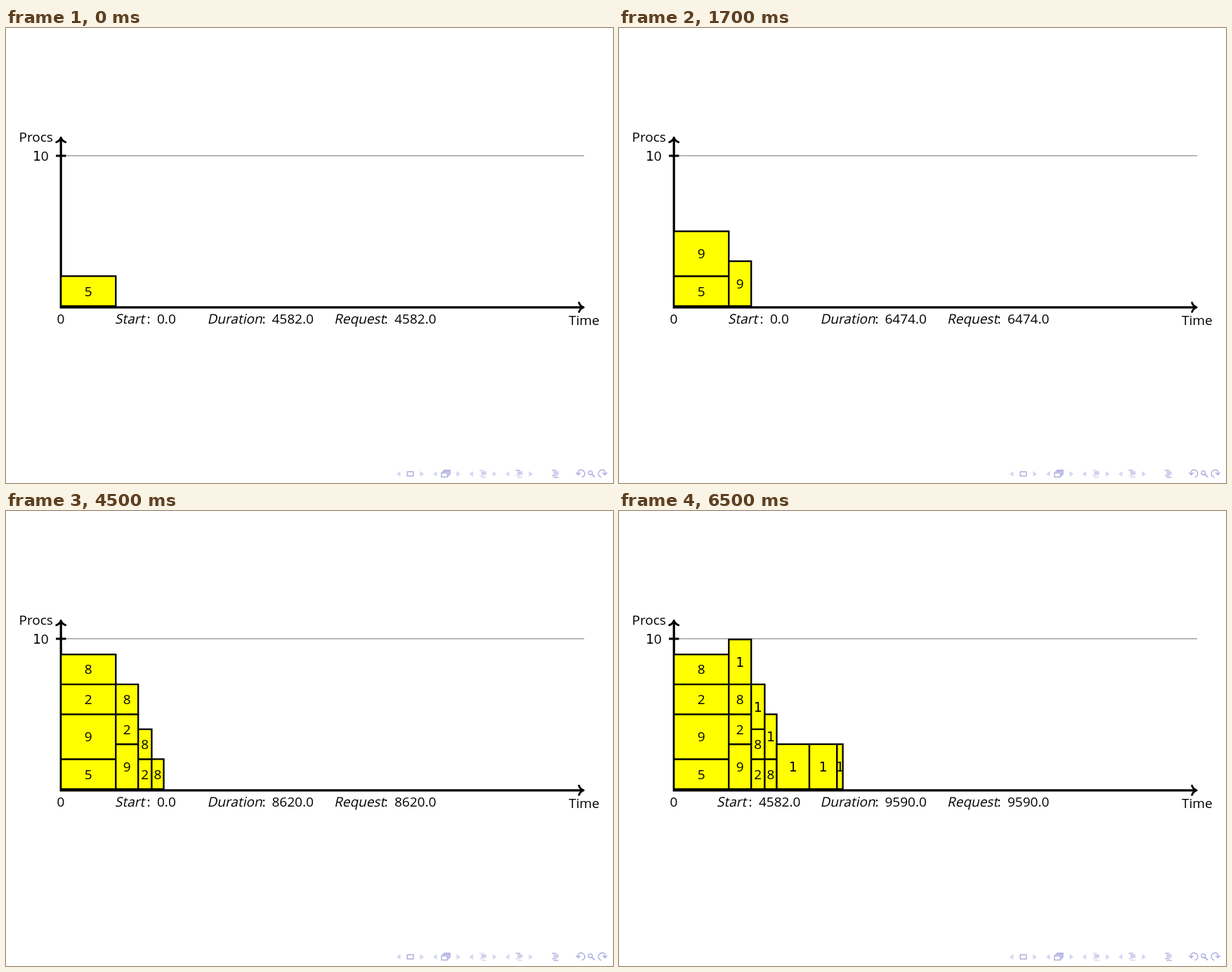
These frames come from a looping animation (864x648 px, 8000 ms). An HTML page:

```html
<!DOCTYPE html>
<html lang="en">
<head>
<meta charset="utf-8">
<title>Job schedule</title>
<style>
html, body { margin: 0; width: 100%; height: 100%; overflow: hidden; background: #fff; }
svg { display: block; width: 864px; height: 648px; }
text { font: 19px "Open Sans", "Noto Sans", sans-serif; fill: #000; }
.one { font: 19px "DejaVu Sans", sans-serif; }
.mid { text-anchor: middle; }
.axis { fill: none; stroke: #000; stroke-width: 3.2; }
.tip { fill: none; stroke: #000; stroke-width: 2.8; stroke-linecap: round; stroke-linejoin: round; }
.block rect { fill: #ff0; stroke: #000; stroke-width: 2.3; }
.pale { fill: #d6d6f0; }
.paleLine { stroke: #d6d6f0; fill: none; stroke-width: 1.4; }
.deepLine { stroke: #adade0; fill: none; stroke-width: 1.4; }

.block, .info { animation: 8s step-end infinite; }
.block.s1 { animation-name: add1; }
.block.s2 { animation-name: add2; }
.block.s3 { animation-name: add3; }
.block.s4 { animation-name: add4; }
.info.s0 { animation-name: info0; }
.info.s1 { animation-name: info1; }
.info.s2 { animation-name: info2; }
.info.s3 { animation-name: info3; }
.info.s4 { animation-name: add4; }
@keyframes add1 { 0% { visibility: hidden } 6.25%, 100% { visibility: visible } }
@keyframes add2 { 0% { visibility: hidden } 31.25%, 100% { visibility: visible } }
@keyframes add3 { 0% { visibility: hidden } 56.25%, 100% { visibility: visible } }
@keyframes add4 { 0% { visibility: hidden } 81.25%, 100% { visibility: visible } }
@keyframes info0 { 0% { visibility: visible } 6.25%, 100% { visibility: hidden } }
@keyframes info1 { 0% { visibility: hidden } 6.25% { visibility: visible } 31.25%, 100% { visibility: hidden } }
@keyframes info2 { 0% { visibility: hidden } 31.25% { visibility: visible } 56.25%, 100% { visibility: hidden } }
@keyframes info3 { 0% { visibility: hidden } 56.25% { visibility: visible } 81.25%, 100% { visibility: hidden } }
</style>
</head>
<body>
<svg viewBox="0 0 864 648">
  <path d="M78 181.8H823" stroke="#8c8c8c" stroke-width="1.2"/>
  <path class="axis" d="M78.2 398V157M76.6 397.8H821M71 182H85.4"/>
  <path class="tip" d="M71.6 162.6C74.6 161.6 77.4 158.6 78.2 156C79 158.6 81.8 161.6 84.8 162.6"/>
  <path class="tip" d="M815.6 391.2C816.6 394.2 819.6 397 822.2 397.8C819.6 398.6 816.6 401.4 815.6 404.4"/>
  <text x="18.5" y="162">Procs</text>
  <text x="801" y="423">Time</text>
  <text class="one" x="38" y="189">1</text>
  <text x="49.8" y="189">0</text>
  <text class="mid" x="78" y="421">0</text>
  <g id="blocks"></g>
  <g id="infos"></g>
  <g id="nav">
    <path class="deepLine" d="M571.2 632H579.8V638H571.2Z"/>
    <path class="deepLine" d="M619.8 633.5H628.2V639.5H619.8ZM621.8 633V631.5H630.2V637.5H628.5M623.8 631V629.7H632V635.6H630.5"/>
    <path class="deepLine" d="M814.5 635.2C812.6 626.5 823.6 628.3 823.8 634.6Q823.8 638.6 819.6 640M811.4 633L814.6 636.4L817.6 633"/>
    <path class="deepLine" d="M852.5 635.2C854.4 626.5 843.4 628.3 843.2 634.6Q843.2 638.6 847.4 640M855.6 633L852.4 636.4L849.4 633"/>
    <circle class="deepLine" cx="831.8" cy="633.4" r="2.8"/>
    <path class="deepLine" style="stroke-width:2" d="M834 635.6L838 639.6"/>
  </g>
</svg>
<script>
const NS = "http://www.w3.org/2000/svg";
const $ = id => document.getElementById(id);

function add(parent, tag, attrs, content = "") {
  const el = document.createElementNS(NS, tag);
  for (const key in attrs) el.setAttribute(key, attrs[key]);
  el.textContent = content;
  return parent.appendChild(el);
}

// Jobs in order of arrival, with the processors each one takes.
const jobs = [["5", 2], ["9", 3], ["2", 2], ["8", 2], ["1", 3]];
const edges = [78.2, 156.3, 188.2, 207.4, 224.5, 271, 310.3, 318.6];
const stacks = [[0, 1, 2, 3], [1, 2, 3, 4], [2, 3, 4], [3, 4], [4], [4], [4]];
const BASE = 396, UNIT = 21.3;

stacks.forEach((stack, col) => {
  const x = edges[col], width = edges[col + 1] - x;
  let bottom = BASE;
  for (const step of stack) {
    const [name, procs] = jobs[step];
    const height = procs * UNIT, y = bottom - height;
    const g = add($("blocks"), "g", { class: `block s${step}` });
    add(g, "rect", { x, y, width, height });
    add(g, "text", {
      class: name === "1" ? "mid one" : "mid",
      x: x + width / 2, y: y + height / 2 + 6.8
    }, name);
    bottom = y;
  }
});

function field(g, x, label, colonX, valueX, value) {
  add(g, "text", { transform: `translate(${x} 421) skewX(-12)` }, label);
  add(g, "text", { x: colonX, y: 421 }, ":");
  add(g, "text", { x: valueX, y: 421 }, value);
}

["4582.0", "6474.0", "7610.0", "8620.0", "9590.0"].forEach((time, step) => {
  const g = add($("infos"), "g", { class: `info s${step}` });
  const late = step === 4, x = late ? 139 : 155;
  field(g, x, "Start", x + 45.5, x + 60, late ? "4582.0" : "0.0");
  field(g, 286.5, "Duration", 364.5, 378.5, time);
  field(g, 467, "Request", 538.5, 553, time);
});

for (const x of [556, 608, 659.5, 711]) {
  add($("nav"), "path", { class: "pale", d: `M${x} 635L${x + 5.4} 631V639Z` });
  add($("nav"), "path", { class: "pale", d: `M${x + 38.8} 635L${x + 33.4} 631V639Z` });
}

// Outline icons: five short lines, the dark ones marked by a 1.
const lines = [[0, 6.5], [2.4, 9.6], [2.4, 9.6], [0, 6.5], [2.4, 9.6]];
for (const [x, marks] of [[674, "01100"], [725.5, "11100"], [777, "11111"]]) {
  lines.forEach(([from, to], i) => add($("nav"), "path", {
    class: marks[i] === "1" ? "deepLine" : "paleLine",
    d: `M${x + from} ${630 + i * 2.5}H${x + to}`
  }));
}
</script>
</body>
</html>
```
